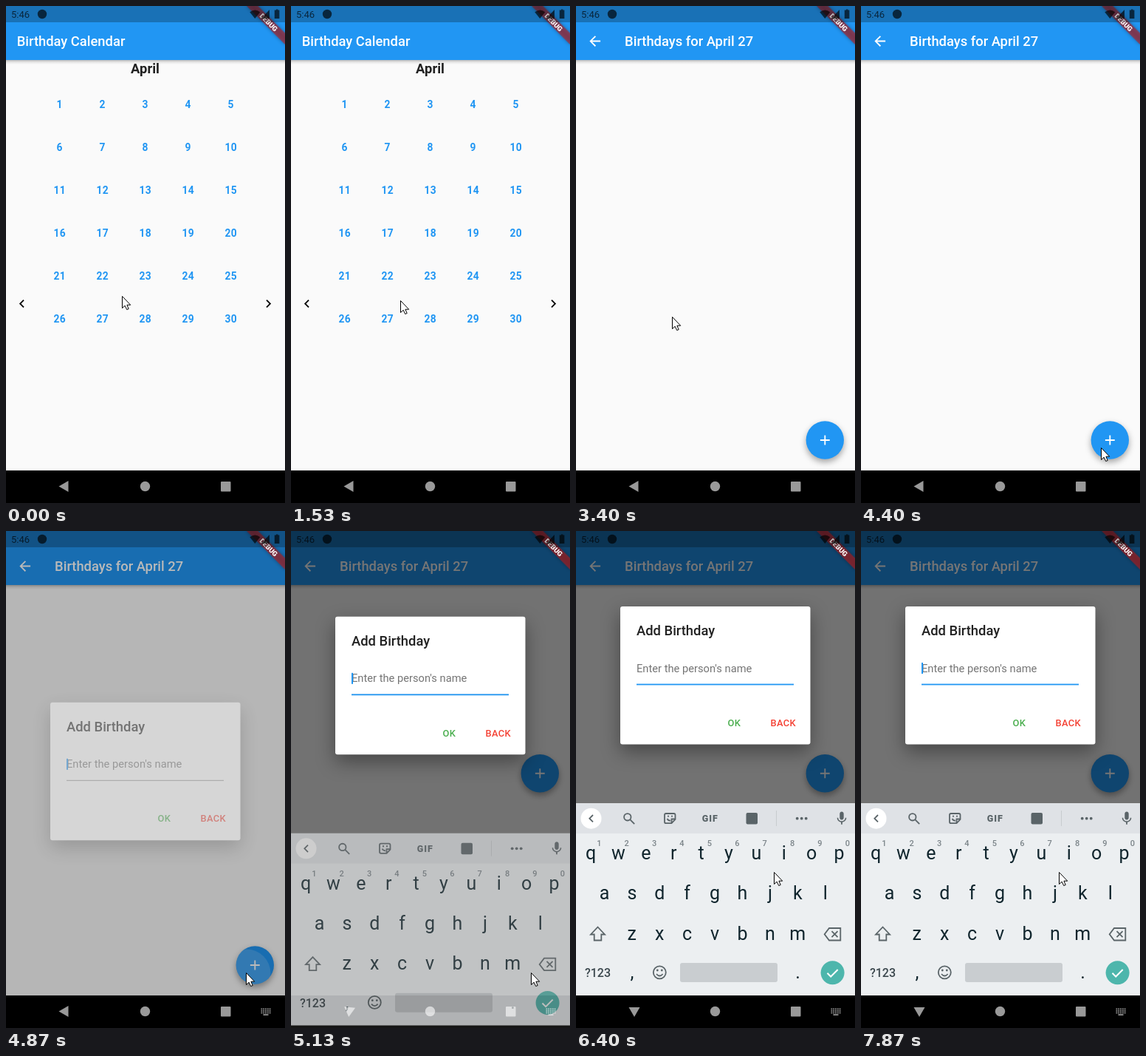
Recreate the animation shown at these times as an HTML page. Size 378 by 672 pixels, loop 8 s.

```html
<!DOCTYPE html>
<html lang="en">
<head>
<meta charset="utf-8">
<title>Birthday Calendar</title>
<style>
  html, body { margin: 0; width: 100%; height: 100%; overflow: hidden; background: #000; }
  svg { display: block; width: 100%; height: 100%; }
  text { font-family: Roboto, sans-serif; white-space: pre; }
  .title { font-size: 18.37px; font-weight: 500; }
  .day { font-size: 13.8px; font-weight: 700; letter-spacing: .4px; fill: #2196f3; text-anchor: middle; }
  .button { font-size: 12.86px; font-weight: 500; letter-spacing: .3px; }
  .key { font-size: 25px; fill: #10252d; text-anchor: middle; }
  .hint { font-size: 11px; font-weight: 500; fill: #7b8489; text-anchor: middle; }
  .line { fill: none; stroke: #5a6468; stroke-width: 1.8; }
  #card { filter: drop-shadow(0 10px 13px rgba(0, 0, 0, .38)); }
  .disc { filter: drop-shadow(0 4px 4px rgba(0, 0, 0, .35)); }
</style>
</head>
<body>
<svg viewBox="0 0 378 672" preserveAspectRatio="none">
  <defs>
    <linearGradient id="shade" x2="0" y2="1">
      <stop stop-opacity=".26"/><stop offset=".5" stop-opacity=".08"/><stop offset="1" stop-opacity="0"/>
    </linearGradient>
    <clipPath id="cell"><rect x="102" y="393" width="58" height="58" rx="2"/></clipPath>
    <clipPath id="fabClip"><circle cx="337.3" cy="587" r="25.7"/></clipPath>
  </defs>

  <g id="calendar">
    <rect width="378" height="628" fill="#fafafa"/>
    <rect y="73" width="378" height="6" fill="url(#shade)"/>
    <rect width="378" height="73" fill="#2196f3"/>
    <text class="title" x="14.7" y="54.3" fill="#fff">Birthday Calendar</text>
    <text x="188.5" y="91" font-size="18.4" font-weight="700" fill="#212121" text-anchor="middle">April</text>
    <g clip-path="url(#cell)"><circle id="ripple" cx="124" cy="418" fill="#2196f3" fill-opacity=".15"/></g>
    <g id="days"></g>
    <path transform="translate(10.5 391.5) scale(.919)" d="M15.41 7.41L14 6l-6 6 6 6 1.41-1.41L10.83 12z"/>
    <path transform="translate(344.5 391.5) scale(.919)" d="M10 6L8.59 7.41 13.17 12l-4.58 4.59L10 18l6-6z"/>
  </g>

  <g id="page">
    <rect width="378" height="628" fill="#fafafa"/>
    <rect y="73" width="378" height="6" fill="url(#shade)"/>
    <rect width="378" height="73" fill="#2196f3"/>
    <path transform="translate(14.7 36.5) scale(.919)" fill="#fff" d="M20 11H7.83l5.59-5.59L12 4l-8 8 8 8 1.41-1.41L7.83 13H20z"/>
    <text class="title" x="66.1" y="54.3" fill="#fff">Birthdays for April 27</text>
    <g id="fab">
      <circle class="disc" cx="337.3" cy="587" r="25.7" fill="#2196f3"/>
      <g clip-path="url(#fabClip)"><circle id="splash" cx="326" cy="598" fill="#fff"/></g>
      <path transform="translate(326.3 576) scale(.919)" fill="#fff" d="M19 13h-6v6h-2v-6H5v-2h6V5h2v6h6z"/>
    </g>
  </g>

  <rect id="barrier" width="378" height="628"/>

  <g id="dialog">
    <rect id="card" x="60" width="257.5" height="186.5" rx="3" fill="#fff"/>
    <text class="title" x="82" y="39.3" fill="#212121">Add Birthday</text>
    <text x="82" y="88.6" font-size="14.7" fill="#757575">Enter the person's name</text>
    <rect id="caret" x="82" y="76" width="2" height="15" fill="#2196f3"/>
    <rect x="82" y="105" width="213" height="1" fill="#8c8c8c"/>
    <rect id="focus" x="82" y="104.6" width="213" height="1.8" fill="#2196f3"/>
    <text class="button" x="205.6" y="161.7" fill="#4caf50">OK</text>
    <text class="button" x="263.6" y="161.7" fill="#f44336">BACK</text>
  </g>

  <g transform="translate(378 0) rotate(45) scale(.919)">
    <rect x="-40" y="28" width="80" height="12" fill="#b71c1c" fill-opacity=".63" style="filter:drop-shadow(0 0 3px rgba(0,0,0,.5))"/>
    <text y="37.7" font-size="10.2" font-weight="900" fill="#fff" text-anchor="middle">DEBUG</text>
  </g>

  <rect width="378" height="22" fill-opacity=".25"/>
  <g fill-opacity=".66">
    <text x="7" y="16" font-size="13">5:46</text>
    <circle cx="49" cy="11" r="6.2"/>
    <path d="M330.3 8.2Q337.3 2.8 344.3 8.2L337.3 17zM357 5V17H345.5zM365 5.5h1V4.4h2.4V5.5h2V17h-6.6V5.5z"/>
  </g>

  <rect y="628" width="378" height="44"/>
  <rect id="under" y="628" width="378" height="44" fill="#444"/>
  <g id="keyboard">
    <rect y="368" width="378" height="41.5" fill="#dfe2e6"/>
    <rect y="409" width="378" height="219" fill="#eceff1"/>
    <rect y="628" width="378" height="44"/>
    <circle cx="20.5" cy="388.7" r="14" fill="#fff"/>
    <path class="line" stroke-width="2" d="M23 384l-4.7 4.7 4.7 4.7"/>
    <path class="line" d="M74.5 386.8a4.7 4.7 0 1 1-9.4 0a4.7 4.7 0 1 1 9.4 0M73.2 390.2l6 6"/>
    <path class="line" d="M122 382h10.5q2 0 2 2v6l-5 5.2h-7.5q-2 0-2-2V384q0-2 2-2zM134.500 389.500h-5v5.500M123.500 389q1.500 3 4.500 2.500M124 385.600h2M129 385.600h2"/>
    <text x="181.800" y="393" font-size="12.500" font-weight="900" letter-spacing="1" fill="#5a6468" text-anchor="middle">GIF</text>
    <rect x="230.500" y="381" width="15.500" height="15.500" rx="2" fill="#5a6468"/>
    <path d="M271.500 378v21" stroke="#c8cccf"/>
    <g fill="#5a6468">
      <circle cx="299.700" cy="388.700" r="1.900"/><circle cx="305.700" cy="388.700" r="1.900"/><circle cx="311.700" cy="388.700" r="1.900"/>
      <path transform="translate(349.200 377.800) scale(.9)" d="M12 14c1.660 0 3-1.340 3-3V5c0-1.660-1.340-3-3-3S9 3.340 9 5v6c0 1.660 1.340 3 3 3zM17.300 11c0 3-2.540 5.100-5.300 5.100S6.700 14 6.700 11H5c0 3.410 2.720 6.230 6 6.720V21h2v-3.280c3.280-.48 6-3.300 6-6.720z"/>
    </g>
    <g id="keys"></g>
    <path class="line" d="M29.500 535.500L39 545.500h-4.700v8h-9.600v-8H20z"/>
    <path class="line" d="M343 537h15.300v16.500H343l-6.300-8.200zM346.500 541.200l8 8M354.500 541.200l-8 8"/>
    <text x="29.500" y="603" font-size="16" font-weight="500" fill="#3c484e" text-anchor="middle">?123</text>
    <circle class="line" cx="113.300" cy="596.800" r="8.500"/>
    <path class="line" d="M109 599q4.300 5 8.600 0"/>
    <circle cx="110.300" cy="594" r="1.400" fill="#5a6468"/><circle cx="116.300" cy="594" r="1.400" fill="#5a6468"/>
    <rect x="141" y="584" width="132" height="26" rx="3" fill="#c9cdd0"/>
    <circle cx="347.600" cy="597.300" r="16" fill="#4db6ac"/>
    <path d="M340.500 597.800l4.700 4.700 9.500-9.500" fill="none" stroke="#fff" stroke-width="2"/>
  </g>

  <g fill="#fff" fill-opacity=".6">
    <path id="back" d="M71.500 649.500l13-7.500v15z"/>
    <circle cx="188.500" cy="649.500" r="6.700"/>
    <rect x="291" y="643" width="13.500" height="13.500" rx="1"/>
    <g id="imeIcon"></g>
  </g>

  <path id="pointer" d="M.5.500V16.500L4.200 13.200 6.700 18.500 9.200 17.500 6.900 12.200H11.700z" fill="#fff" stroke="#000"/>
</svg>

<script>
const $ = id => document.getElementById(id);
const NS = 'http://www.w3.org/2000/svg';
const LOOP = 8000, STEP = 200 / 3;

function add(parent, tag, attrs, text = '') {
  const el = document.createElementNS(NS, tag);
  for (const name in attrs) el.setAttribute(name, attrs[name]);
  el.textContent = text;
  parent.append(el);
}
const label = (parent, cls, x, y, text) => add(parent, 'text', { class: cls, x, y }, text);

for (let i = 0; i < 30; i++)
  label($('days'), 'day', 72.7 + i % 5 * 58, 137.8 + Math.floor(i / 5) * 58, i + 1);

[['qwertyuiop', 20, 444], ['asdfghjkl', 38.5, 498], ['zxcvbnm', 75.8, 552.5]].forEach(([row, x, y], r) =>
  [...row].forEach((ch, i) => {
    const cx = x + i * 37.4;
    label($('keys'), 'key', cx, y, ch);
    if (!r) label($('keys'), 'hint', cx + 11.3, 426, (i + 1) % 10);
  }));
label($('keys'), 'key', 76, 605, ',');
label($('keys'), 'key', 300.5, 605, '.');

for (let i = 0; i < 15; i++)
  add($('imeIcon'), 'rect', { x: 345.5 + i % 5 * 2.8, y: 645.5 + Math.floor(i / 5) * 2.6, width: 1.8, height: 1.7 });
add($('imeIcon'), 'rect', { x: 348.5, y: 653.3, width: 7, height: 1.7 });

const clamp = v => Math.min(1, Math.max(0, v));
const span = (t, start, length) => clamp((t - start) / length);
const smooth = p => p * p * (3 - 2 * p);

function bezier(x1, y1, x2, y2) {
  const at = (a, b, s) => 3 * a * s * (1 - s) ** 2 + 3 * b * s * s * (1 - s) + s ** 3;
  return x => {
    let lo = 0, hi = 1;
    for (let i = 0; i < 24; i++) {
      const mid = (lo + hi) / 2;
      if (at(x1, x2, mid) < x) lo = mid; else hi = mid;
    }
    return at(y1, y2, hi);
  };
}
const fastOutSlowIn = bezier(.4, 0, .2, 1);
const easeIn = bezier(.42, 0, 1, 1);
const easeOut = bezier(0, 0, .58, 1);
const ease = bezier(.25, .1, .25, 1);

// Rows of [time, ...values]
function track(rows, t, curve = p => p) {
  let i = 0;
  while (i < rows.length - 2 && t >= rows[i + 1][0]) i++;
  const a = rows[i], b = rows[i + 1];
  const p = curve(span(t, a[0], b[0] - a[0]));
  return a.slice(1).map((v, k) => v + (b[k + 1] - v) * p);
}
const POINTER = [
  [1340, 157, 392], [1930, 123, 417], [3333, 123, 417], [3400, 130, 420],
  [4200, 318, 593], [4400, 325, 597], [5190, 325, 597], [5600, 268, 461]
];
const KEYBOARD = [[5070, 52, 0], [5130, 42, .64], [5200, 14, .86], [5265, 1, .95], [5330, 0, 1]];

const move = (id, x, y) => $(id).setAttribute('transform', `translate(${x} ${y})`);
const fade = (id, v) => $(id).setAttribute('opacity', v);

function render(time) {
  const t = Math.floor((time + 4) / STEP) * STEP;

  const route = span(t, 2363, 300);
  move('page', 0, 168 * (1 - fastOutSlowIn(route)));
  fade('page', route ? easeIn(route) : 0);
  $('ripple').setAttribute('r', t < 2390 ? 0 : 20 + 23 * span(t, 2400, 67));

  const open = span(t, 4822, 150);
  fade('barrier', open ? .54 * ease(open) : 0);
  fade('dialog', open ? easeOut(open) : 0);
  const lift = 1 - (1 - span(t, 5066, 100)) ** 2;
  move('dialog', 0, 231.8 - 129.8 * lift);
  move('fab', 0, t < 5060 ? 0 : -259.3);
  $('splash').setAttribute('r', t < 4790 ? 0 : 14 + 36 * span(t, 4790, 150));
  fade('splash', .16 * (1 - span(t, 4900, 200)));
  fade('caret', Math.floor((t - 4850) / 500) % 2 ? 0 : 1);
  const focus = span(t, 4870, 200);
  $('focus').setAttribute('x', 188.5 - 106.5 * focus);
  $('focus').setAttribute('width', 213 * focus);

  const [drop, alpha] = track(KEYBOARD, t);
  move('keyboard', 0, drop);
  fade('keyboard', alpha);
  fade('under', alpha > 0 && alpha < 1 ? 1 - span(t, 5130, 130) : 0);
  $('back').setAttribute('transform', `rotate(${-90 * span(t, 5040, 100)} 79 649.5)`);
  fade('imeIcon', t < 4860 ? 0 : 1);

  const [x, y] = track(POINTER, t, smooth);
  move('pointer', Math.round(x), Math.round(y));
}

function tick() {
  render(performance.now() % LOOP);
  requestAnimationFrame(tick);
}
tick();
</script>
</body>
</html>
```
